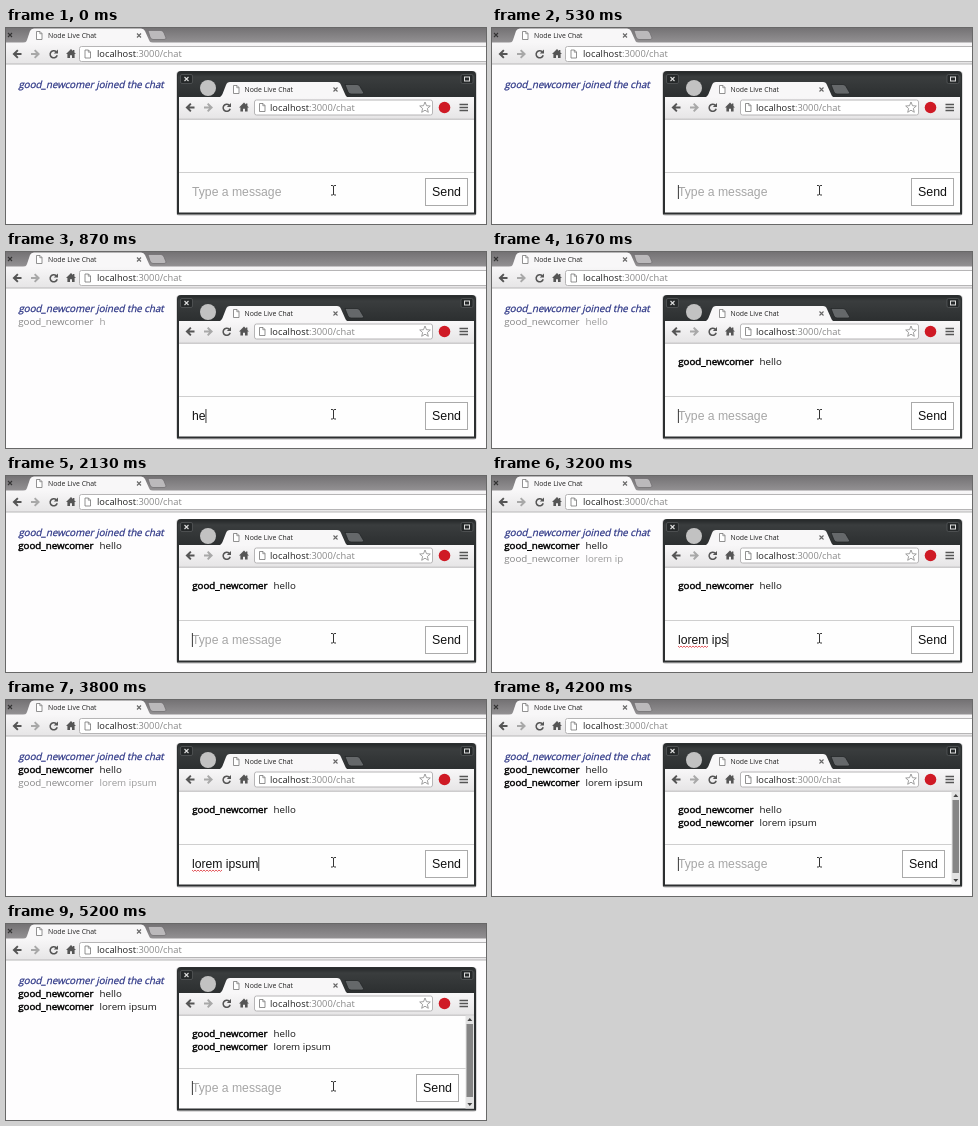
An HTML page for the animation above (5.59 s loop, 480x196 px).

```html
<!DOCTYPE html>
<html lang="en">
<head>
<meta charset="utf-8">
<title>Node Live Chat</title>
<style>
  html, body { margin: 0; width: 100%; height: 100%; overflow: hidden; background: #fff; }
  svg { display: block; width: 480px; height: 196px; }
  text { white-space: pre; font: 9.75px "Open Sans", "Noto Sans", sans-serif; }
  .title { font-size: 6.9px; fill: #222; }
  .url { font-size: 9.3px; fill: #222; }
  .url tspan { fill: #888; }
  .joined { fill: #2c3585; stroke: #2c3585; stroke-width: .25px; }
  .pending { fill: #999; }
  .pending .name { fill: #858585; }
  .sent { fill: #151515; }
  .sent .name { fill: #000; stroke: #000; stroke-width: .45px; }
  .form { font: 12.2px "Liberation Sans", Arial, sans-serif; fill: #111; }
  #placeholder { fill: #a6a6a6; }
  .line { fill: none; stroke: #555; stroke-width: 1.5; }
</style>
</head>
<body>
<svg viewBox="0 0 480 196">
  <defs>
    <linearGradient id="strip" x2="0" y2="1"><stop stop-color="#747274"/><stop offset="1" stop-color="#949294"/></linearGradient>
    <linearGradient id="bar" x2="0" y2="1"><stop stop-color="#f8f7f8"/><stop offset="1" stop-color="#e6e5e6"/></linearGradient>
    <linearGradient id="frame" x2="0" y2="1"><stop stop-color="#26292a"/><stop offset=".2" stop-color="#3a3d3e"/><stop offset="1" stop-color="#2c2f30"/></linearGradient>
    <g id="doc"><path d="M-2.5-4H1L3-2V4H-2.5Z" fill="#fff" stroke="#777" stroke-width=".8"/><path d="M.8-4V-1.8H3" fill="none" stroke="#777" stroke-width=".7"/></g>
    <path id="cross" d="M-2-2L2 2M2-2L-2 2" fill="none" stroke-width="1.1"/>
    <path id="arrow" d="M4.5-1H-.5L1.5-3.2L.2-4.5L-4.5 0L.2 4.5L1.5 3.2L-.5 1H4.5Z"/>
    <g id="nav">
      <use href="#arrow" fill="#555"/>
      <use href="#arrow" transform="translate(18.5) scale(-1 1)" fill="#a8a8a8"/>
      <path class="line" d="M39.2-2.4A3.6 3.6 0 1 0 40.2 1.3"/><path d="M41-4.6V-.5H36.8Z" fill="#555"/>
      <path d="M54-5L49 0H50.4V4H53V1.2H55V4H57.6V0H59L57.4-1.6V-4H56V-3Z" fill="#555"/>
    </g>
  </defs>

  <rect width="480" height="196" fill="#fefdfe"/>
  <rect width="480" height="15" fill="url(#strip)"/>
  <rect y="14.5" width="480" height="21.5" fill="url(#bar)"/>
  <path d="M17 15Q20 15 21 12L24 3Q25 .5 28 .5H135Q138 .5 139 3L143 12Q144 15 147 15Z" fill="#f8f7f8"/>
  <path d="M142 2.5H155Q157 2.5 158 5L160 10Q160 11.5 158 11.5H147Q145 11.5 144 9Z" fill="#bbb9bb" stroke="#6d6b6d" stroke-width=".7"/>
  <path d="M0 36H480" stroke="#b8b7b8"/>
  <use href="#cross" x="4" y="7" stroke="#333"/>
  <use href="#doc" x="33" y="7.5"/>
  <text class="title" x="42" y="10">Node Live Chat</text>
  <use href="#cross" x="133" y="7.5" stroke="#666"/>
  <use href="#nav" x="11" y="26"/>
  <rect x="73.5" y="18.5" width="420" height="15" rx="2" fill="#fff" stroke="#b6b5b6"/>
  <use href="#doc" x="81.5" y="26"/>
  <text class="url" x="91" y="29.4">localhost<tspan>:3000/chat</tspan></text>

  <text class="joined" transform="translate(12.5 59.5) skewX(-13)">good_newcomer joined the chat</text>
  <g id="logHost"></g>

  <rect x="170" y="43" width="301" height="145" rx="4" fill="#000" opacity=".14"/>
  <path d="M171 186.5V47Q171 43 175 43H466Q470 43 470 47V186.5Z" fill="#2c2f30"/>
  <path d="M172 69V47Q172 44 175 44H466Q469 44 469 47V69Z" fill="url(#frame)"/>
  <g fill="#252829" stroke="#5b5e5f" stroke-width=".7">
    <rect x="174.5" y="46.5" width="12" height="9" rx="1.5"/>
    <rect x="455" y="46.5" width="12" height="9" rx="1.5"/>
  </g>
  <use href="#cross" x="180.5" y="51" stroke="#ddd"/>
  <rect x="458.5" y="49" width="5" height="4" fill="none" stroke="#ddd"/>
  <circle cx="202" cy="60" r="8" fill="#c2c2c2"/>
  <path d="M211 70Q215 69.5 216.5 66L220 57Q221 54 224 54H331Q334 54 335 57L339 66Q340 69.5 344 70Z" fill="#f8f7f8"/>
  <path d="M339 56.5H351Q353 56.5 354 58.5L357.5 64.5Q358 66 356 66H345Q343 66 342 64Z" fill="#65686a" stroke="#202324" stroke-width=".7"/>
  <use href="#doc" x="230" y="61.5"/>
  <text class="title" x="238.5" y="64">Node Live Chat</text>
  <use href="#cross" x="329.5" y="61.5" stroke="#666"/>
  <rect x="173" y="69" width="295" height="22" fill="url(#bar)"/>
  <use href="#nav" x="184" y="79.5"/>
  <rect x="248.5" y="72" width="178" height="15" rx="2" fill="#fff" stroke="#b6b5b6"/>
  <use href="#doc" x="256" y="79.5"/>
  <text class="url" x="264" y="83">localhost<tspan>:3000/chat</tspan></text>
  <path d="M419 74L420.5 77.7L424.3 78L421.4 80.5L422.3 84.3L419 82.2L415.7 84.3L416.6 80.5L413.7 78L417.5 77.7Z" fill="#fff" stroke="#888" stroke-width=".8"/>
  <circle cx="438.5" cy="79.5" r="5.8" fill="#cf1a25"/>
  <path class="line" d="M453.5 76.5H462M453.5 79.5H462M453.5 82.5H462"/>
  <rect x="173" y="91" width="295" height="93.5" fill="#fefefe"/>
  <path d="M173 91.2H468" stroke="#b8b7b8"/>
  <path d="M173 144.5H468" stroke="#cfcfcf"/>

  <g id="logGuest"></g>
  <text id="placeholder" class="form" x="186" y="168">Type a message</text>
  <text id="typed" class="form" x="186" y="168"></text>
  <path id="squiggle" fill="none" stroke="#e0474c" stroke-width=".9"/>
  <path id="caret" d="M.4 157V171" stroke="#222" stroke-width=".9"/>
  <g id="send">
    <rect x="419.5" y="150.5" width="42" height="27" fill="#fff" stroke="#aaa"/>
    <text class="form" x="426" y="168.2" style="font-size:12.4px">Send</text>
  </g>
  <g id="scrollbar">
    <rect x="459.5" y="91.5" width="8.5" height="93" fill="#e3e3e3"/>
    <rect x="460.5" y="100" width="6.5" height="73" fill="#858585"/>
    <path d="M461.3 97L463.8 94L466.3 97ZM461.3 179L463.8 182L466.3 179Z" fill="#444"/>
  </g>
  <path d="M325 157.5H326.8L327.5 158.3L328.2 157.5H330M327.5 158V166.5M325 167H326.8L327.5 166.2L328.2 167H330" fill="none" stroke="#333"/>
</svg>
<script>
const LOOP = 5590, BLINK = 500, LAG = 65;
const USER = 'good_newcomer';
const INPUT_X = 186;
const $ = id => document.getElementById(id);

// Each message: moments of its key presses, of sending, and of delivery to the host page.
const messages = [
  { text: 'hello', keys: [730, 870, 1000, 1070, 1130], sent: 1670, delivered: 1730 },
  { text: 'lorem ipsum', keys: [2200, 2270, 2400, 2470, 2530, 2600, 2870, 3070, 3200, 3400, 3530], sent: 4130, delivered: 4130 }
];
const events = [-BLINK, ...messages.flatMap(m => [...m.keys, m.sent])];

function addRow(log, x, y) {
  const group = document.createElementNS('http://www.w3.org/2000/svg', 'g');
  group.innerHTML = `<text class="name" x="${x}" y="${y}">${USER}</text><text x="${x + 81.3}" y="${y}"></text>`;
  log.append(group);
  return group;
}

function setRow(row, text, sent) {
  row.style.display = text ? '' : 'none';
  row.setAttribute('class', sent ? 'sent' : 'pending');
  row.lastChild.textContent = text;
}

function show(id, visible) {
  $(id).style.display = visible ? '' : 'none';
}

messages.forEach((m, i) => {
  m.hostRow = addRow($('logHost'), 12.2, 73 + 13.4 * i);
  m.guestRow = addRow($('logGuest'), 186.2, 112.8 + 13.4 * i);
});

let wave = `M${INPUT_X} 170`;
for (let i = 0; i < 10; i++) wave += 'l1.5 1.4l1.5 -1.4';
$('squiggle').setAttribute('d', wave);

const typedAt = (m, t) => m.text.slice(0, m.keys.filter(k => k <= t).length);

function draw(now) {
  const t = now % LOOP;
  let input = '';
  for (const m of messages) {
    if (t < m.sent) input ||= typedAt(m, t);
    // The last letter reaches the host together with its key press.
    const echo = t >= m.keys.at(-1) ? m.text : typedAt(m, t - LAG);
    setRow(m.hostRow, echo, t >= m.delivered);
    setRow(m.guestRow, t >= m.sent ? m.text : '', true);
  }

  $('typed').textContent = input;
  show('placeholder', !input);
  show('squiggle', input.startsWith('lorem '));

  const lastEvent = events.findLast(e => e <= t);
  show('caret', (t - lastEvent) % (2 * BLINK) < BLINK);
  const width = input ? $('typed').getComputedTextLength() : 0;
  $('caret').setAttribute('transform', `translate(${INPUT_X + width})`);

  const overflow = t >= messages[1].sent;
  show('scrollbar', overflow);
  $('send').setAttribute('transform', `translate(${overflow ? -9 : 0})`);
}

function tick() {
  draw(performance.now());
  requestAnimationFrame(tick);
}
tick();
</script>
</body>
</html>
```
